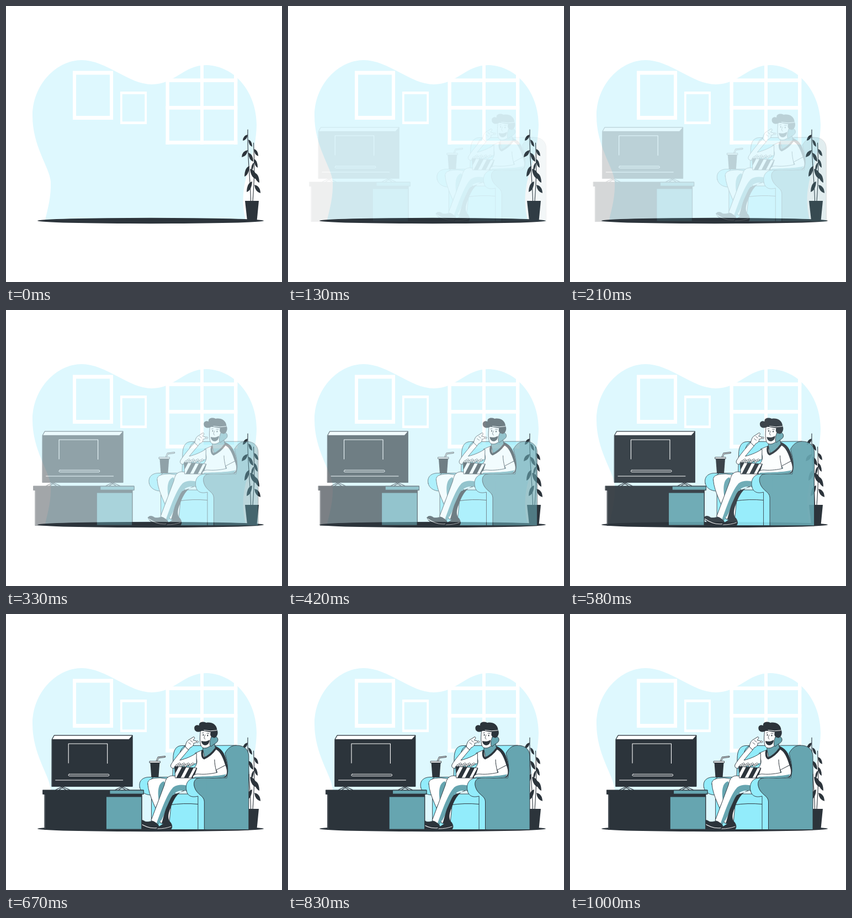
Recreate the animation shown at these times as an HTML page with a canvas. Size 500 by 500 pixels, loop 1.04 s.

```html
<!DOCTYPE html>
<html lang="en">
<head>
<meta charset="utf-8">
<title>Evening at home</title>
<style>
  html, body { margin: 0; width: 100%; height: 100%; overflow: hidden; background: #fff; }
  canvas { display: block; width: 100vmin; height: 100vmin; }
</style>
</head>
<body>
<canvas id="stage" width="500" height="500"></canvas>
<script>
const SIZE = 500, LOOP = 1040, FPS = 24, SLIDE = 30;
const DARK = '#2c343b', TEAL = '#66a5b0', CYAN = '#92ecfb', PALE = '#def8fe', WHITE = '#fff';

const stage = document.getElementById('stage').getContext('2d');
const layerCanvas = document.createElement('canvas');
layerCanvas.width = layerCanvas.height = SIZE;
const layer = layerCanvas.getContext('2d');
let g = stage;

function shape(d, fill, line, width = 1) {
  const path = new Path2D(d);
  if (fill) { g.fillStyle = fill; g.fill(path); }
  if (line) {
    g.strokeStyle = line;
    g.lineWidth = width;
    g.lineJoin = g.lineCap = 'round';
    g.stroke(path);
  }
}
const line = (d, color = DARK, width = 1) => shape(d, null, color, width);
const outlined = (d, fill) => shape(d, fill, DARK, 0.9);

function box(x, y, w, h, fill) {
  g.fillStyle = fill;
  g.fillRect(x, y, w, h);
}

function dot(x, y, rx, ry, fill, stroke) {
  g.beginPath();
  g.ellipse(x, y, rx, ry, 0, 0, Math.PI * 2);
  g.fillStyle = fill;
  g.fill();
  if (stroke) { g.strokeStyle = stroke; g.lineWidth = 0.7; g.stroke(); }
}

function frame(x, y, w, h, side, cap) {
  box(x, y, w, h, WHITE);
  box(x + side, y + cap, w - 2 * side, h - 2 * cap, PALE);
}

function leaf(bx, by, tx, ty) {
  const dx = tx - bx, dy = ty - by;
  shape(`M${bx},${by} Q${bx + dx * 0.95},${by + dy * 0.12} ${tx},${ty}
    Q${bx + dx * 0.12},${by + dy * 0.85} ${bx},${by}Z`, DARK);
}

function drawRoom() {
  box(0, 0, SIZE, SIZE, WHITE);
  shape(`M71,387 C76,366 82,345 81,318 C79,292 48,255 48,199 C48,142 92,98 137,98
    C182,98 222,142 264,142 C306,142 322,107 363,107 C418,109 454,160 454,215
    C453,265 436,300 432,325 C428,345 429,368 434,387Z`, PALE);
  frame(121, 117.5, 73, 88.5, 6, 7);
  frame(207, 155, 48, 59, 3.7, 4.7);
  box(289.5, 131, 6.3, 120, WHITE);
  box(413, 118, 6.3, 133, WHITE);
  box(352, 104, 6, 147, WHITE);
  for (const y of [131.3, 181, 244]) box(289.5, y, 129.8, 6.7, WHITE);

  dot(262, 389, 205, 5.2, DARK);

  line('M443.5,354 C443,315 437,280 438,224', DARK, 1.1);
  line('M447,354 C449,325 451,300 448.500,248', DARK, 1.1);
  [[438, 233, 429, 244], [439, 242, 446, 255], [438, 261, 427, 274],
   [439, 266, 448, 282], [441, 290, 432, 309], [442, 295, 454, 314],
   [449, 259, 457, 272], [449, 277, 456, 293], [449, 284, 444, 299],
   [450, 302, 459, 320], [446, 318, 436, 337], [450, 324, 461, 339]]
    .forEach(l => leaf(...l));
  shape('M433,353 H458 L454.500,389 H437Z', DARK);
}

function drawSofa() {
  outlined('M302,300 L303,262 C303,247 308,239 318,238.500 L418,238 V298Z', CYAN);
  line('M314,262 C314,250 318,241 326,238.500');
  outlined(`M358,390.500 V330 L345,297 H400 L402,285 C402,266 398,259 397,252
    C402,243 408,238 418,238 C432,238 440,246 440,258 V390.500Z`, TEAL);
  outlined('M264,326 H349 V390.500 H264Z', CYAN);
  line('M296,346 Q322,342 348,344.500');
  outlined('M242.500,314 C240,302 248,295.500 260,295.500 H306 V332 H264 V328 C252,328 244,322 242.500,314Z', CYAN);
  line('M264,328 C257,318 255,303 267,296');
}

function drawDrink() {
  line('M273,267 L276,260 L288,258.500', DARK, 2.8);
  line('M273,267 L276,260 L288,258.500', WHITE, 1.1);
  shape('M261.500,269 H278.500 L276.500,296 H263.500Z', DARK);
  outlined('M260.500,266.800 H279.500 V269.600 H260.500Z', WHITE);
}

function drawLegs() {
  outlined(`M257,308 C256,300 264,297 280,297 L304,300 L296,377 L280,379
    C274,352 259,332 257,308Z`, WHITE);
  shape('M286,303 C277,306 274,318 277,338 L270,352 L281,375 L304,330Z', TEAL);
  shape('M330,318 C312,319 304,336 298,352 C293,364 293,372 299,379 L282,380 L296,330Z', DARK);
  outlined(`M272,389.500 C274,385 284,384 289,375 C293,377 297,374 299,379
    C302,384 301,388 299,390 C288,391.500 278,391 272,389.500Z`, DARK);
  line('M275,389 Q289,389 299,385', WHITE, 0.9);
  outlined(`M350,297 L301,293 C291,294 289,301 287,310 L263,374 L276,381
    C286,360 295,336 303,322 C312,319 325,318 330,321 L350,312Z`, WHITE);
  shape('M329,320 C313,318 304,322 297,337 L277,381 L273,379 C283,351 292,326 303,314 C313,307 325,310 332,312Z', TEAL);
  outlined(`M240.500,376 C243,372 248,373 252,376 C258,378 264,374 268,376
    C274,380 279,383 276,387 C273,391 264,391 258,389 C250,387 242,383 240.500,376Z`, DARK);
  line('M242,378.500 C250,384 262,389 273,387.500', WHITE, 1.1);
}

function drawArmrest() {
  outlined(`M327,320 C324,306 332,297 344,297 H362 V390.500 H348
    V330 C337,333 329,330 327,320Z`, CYAN);
  // side panel curls around behind the front rim
  shape('M359.500,390 V340 C359,330 350,329 344,319 C338,308 340,297.500 351,297.500 H364 V390Z', TEAL);
  line('M359.500,390 V340 C359,330 350,329 344,319 C338,308 340,297.500 351,297');
}

function drawBody() {
  shape('M376,238 C390,242 397,252 400,268 C403,280 403,292 398,296 H384 V250Z', DARK);
  outlined(`M343,252 C350,249 354,247 358,246 L378,244 C389,247 394,262 398,274
    L381,284 L382,293 L338,297 L336,282 C345,278 348,268 345,262Z`, WHITE);
  line('M381,284 C379,276 378,270 378,264');
  outlined('M357,239 L377,231 L380,245 C372,252 365,260 360,260 L357,247Z', TEAL);
  line('M356,248 C354.500,254 356,260 359,261.500 C367,258 374,252 379,245', DARK, 3.6);

  // raised arm and hand
  outlined(`M345,252 C338,257 327,262 315,265 L331,246 L325,240 C316,250 304,264 299,273
    C297,279 303,281 310,279 C322,276 337,276 345,271Z`, WHITE);
  shape('M344,270 C333,274 314,276 303,278 C305,280 307,280 310,279 C322,276 337,276 345,272Z', TEAL);
  outlined(`M325,240 C326,234 328,229 333,227 L340,222.500 C343,223 342,226 339,228.500
    L346,230.500 C346,233 342,234 340,234 C341,238 337,241 334,242 L331,246Z`, WHITE);
  line('M334,229 L338,232 M331,233 L335,236', DARK, 0.8);
  dot(347, 231.500, 1.7, 1.7, WHITE, DARK);
}

function drawPopcorn() {
  for (let i = 0; i < 12; i++) dot(309 + i * 2.7, 275 - (i % 3) * 1.7, 2, 1.8, WHITE, DARK);
  const bucket = 'M306,276 L346,279 L340,297 H307Z';
  shape(bucket, WHITE);
  g.save();
  g.clip(new Path2D(bucket));
  for (const x of [306, 320, 334, 347]) shape(`M${x},275 h8 l-12,23 h-8Z`, DARK);
  g.restore();
  line(bucket, DARK, 0.9);
  outlined(`M398,274 C402,284 402,292 396,295 C380,298 355,297 339,297 C337,293 343,289 350,290
    C362,291 375,289 383,287 L381,283Z`, WHITE);
  shape('M399,290 C388,294 360,294 341,295 L341,297 C360,297 385,298 396,295Z', TEAL);
}

function drawHead() {
  outlined('M353,209 C351,222 351,234 354,240 C358,245 366,243 371,238 L378,228 L376,208Z', WHITE);
  outlined('M372,223 C379,220 385,223 384,229 C383,234 377,235 373,239 C369,243 368,232 372,223Z', TEAL);
  shape(`M341.500,208 C340.500,203 345,200 350,202 C349,196 356,194 363,197 C371,195 382,199 382.500,210
    C385,214 384,222 378,224.500 C371,224 369,219 371,214 C364,214 358,211 354,212
    C349,215 342,213.500 341.500,208Z`, DARK);
  line('M359,210.500 Q371,213 382,210.800', WHITE, 1);
  dot(357.500, 219, 1, 1.6, DARK);
  dot(365.500, 220, 1, 1.6, DARK);
  line('M361,219 C359,223 358,226 361,226.500 M355.500,215.500 L358.500,215 M364,216 L368,216.500', DARK, 0.8);
  shape('M354,230 C359,231.500 364,231 369,228 C369,235 364,239 359,237.500 C356,236.500 354,233 354,230Z', DARK);
}

function drawViewer() {
  drawSofa();
  drawDrink();
  drawLegs();
  drawArmrest();
  drawBody();
  drawPopcorn();
  drawHead();
}

function drawTv() {
  outlined('M70,326 H246 V390.500 H70Z', DARK);
  line('M70.500,328 V389', '#6d7579', 0.6);
  outlined('M181.500,331 H245.500 V390 H181.500Z', TEAL);
  outlined('M66.800,318.900 H249 V326.500 H66.800Z', DARK);
  outlined('M188,319.300 H249 V326 H188Z', TEAL);

  for (const x of [102, 210]) {
    line(`M${x - 1},313 l-11,5.500 M${x + 2},313 l-8,5.500 M${x - 2},313 l8,5.500 M${x + 1},313 l12,5.500`, DARK, 1.3);
  }
  outlined('M83,227 L87,219.700 H229 V312.500 H83Z', DARK);
  shape('M84,226.800 L87.500,220.500 H228 L222.500,226.800Z', WHITE);
  line('M113,270 V235 H183.500 V270.500', WHITE, 1.1);
  line('M114.500,290.200 H185 a1.600,1.600 0 0 1 0,3.200 H114.500 a1.600,1.600 0 0 1 0,-3.200Z', WHITE, 1);
  line('M89.500,301 H211.500', WHITE, 1);
}

// Cubic bezier easing with a soft overshoot
function ease(x) {
  if (x >= 1) return 1;
  const curve = (s, a, b) => 3 * (1 - s) * (1 - s) * s * a + 3 * (1 - s) * s * s * b + s * s * s;
  let lo = 0, hi = 1;
  for (let i = 0; i < 24; i++) {
    const mid = (lo + hi) / 2;
    if (curve(mid, 0.36, 0.5) < x) lo = mid; else hi = mid;
  }
  return curve(lo, -0.01, 1.38);
}

function slideIn(draw, shift, alpha) {
  layer.clearRect(0, 0, SIZE, SIZE);
  layer.save();
  layer.translate(shift, 0);
  g = layer;
  draw();
  g = stage;
  layer.restore();
  stage.globalAlpha = alpha;
  stage.drawImage(layerCanvas, 0, 0);
  stage.globalAlpha = 1;
}

// Ticks run at 24 per second, rounded to hundredths
function tickAt(t) {
  let k = Math.floor(t * FPS / 1000) + 1;
  while (Math.round(k * 100 / FPS) * 10 > t) k--;
  return Math.min(k, FPS);
}

function render(t) {
  const k = tickAt(t);
  drawRoom();
  if (k < 3) return;
  const p = ease((k + 0.5) / FPS);
  const alpha = Math.min(1, p), shift = SLIDE * (1 - p);
  slideIn(drawViewer, shift, alpha);
  slideIn(drawTv, -shift, alpha);
}

let start = null;
function loop() {
  const now = performance.now();
  if (start === null) start = now;
  render((now - start) % LOOP);
  requestAnimationFrame(loop);
}
loop();
</script>
</body>
</html>
```
